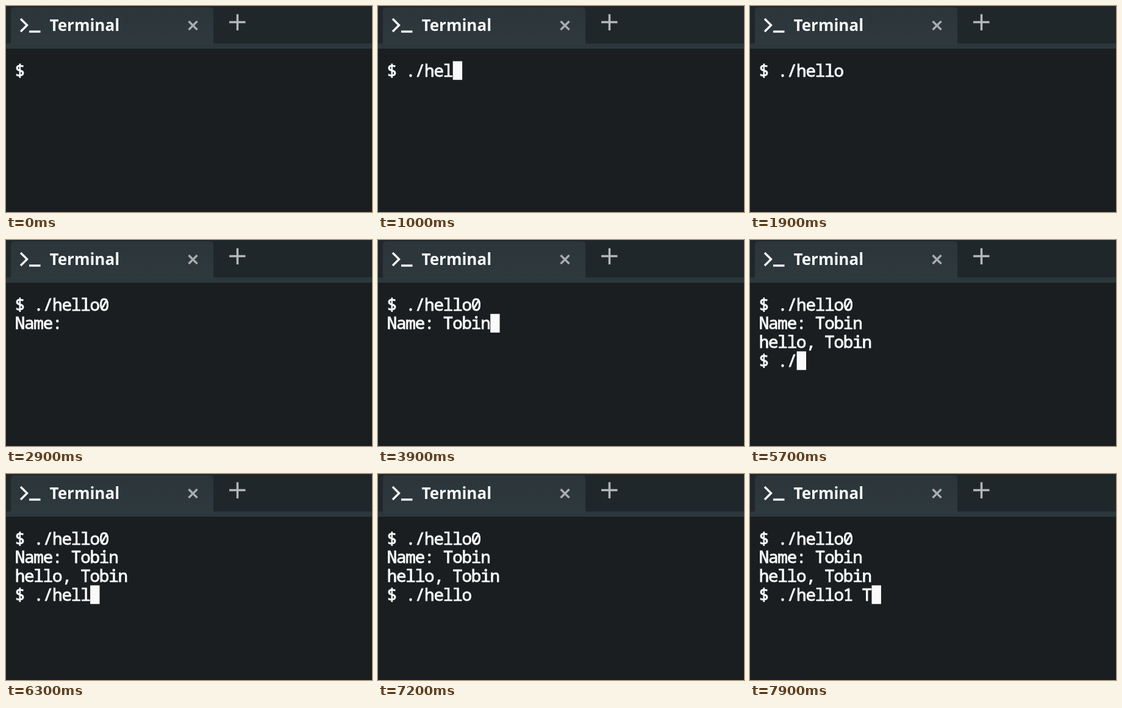
These frames come from a looping animation (600x338 px, 8000 ms). An HTML page:

```html
<!DOCTYPE html>
<html lang="en">
<head>
<meta charset="utf-8">
<title>Terminal</title>
<style>
  html, body { margin: 0; width: 100%; height: 100%; overflow: hidden; background: #1a1e20; }
  svg { display: block; width: 600px; height: 338px; }
  .title { font: 700 26px "Open Sans", "Noto Sans", sans-serif; fill: #f6f7f7; }
  #screen text {
    font: 400 27.5px "Noto Sans Mono", "DejaVu Sans Mono", monospace;
    letter-spacing: -1.14px;
    white-space: pre;
    fill: #f8f9f9;
    stroke: #f8f9f9;
    stroke-width: 0.9px;
  }
  path { fill: none; stroke-width: 3.5; }
</style>
</head>
<body>
<svg viewBox="0 0 600 338">
  <defs>
    <linearGradient id="tab" x2="0" y2="1">
      <stop stop-color="#2b353a"/>
      <stop offset="1" stop-color="#2e393e"/>
    </linearGradient>
  </defs>
  <rect width="600" height="338" fill="#1a1e20"/>
  <rect width="600" height="62" fill="#20272a"/>
  <rect y="61.5" width="600" height="8.5" fill="#2c373c"/>
  <path d="M8 64V8q0-6 6-6H334q6 0 6 6V64z" style="fill:url(#tab)"/>
  <path d="M24 21L34.5 31.5L24 42M38 42H56.5" stroke="#f4f5f5"/>
  <text class="title" x="71.5" y="41">Terminal</text>
  <path d="M299.5 25L313.5 39M313.5 25L299.5 39" stroke="#a9adaf"/>
  <path d="M366 26.5H392.5M379.5 13.5V40" stroke="#b4b8ba"/>
  <g id="screen">
    <text/><text/><text/><text/>
    <rect id="cursor" width="15.4" height="30.6" fill="#fafafa"/>
  </g>
</svg>
<script>
const LOOP = 8000, BLINK = 600;
const LEFT = 15.2, CELL = 15.36, TOP = 90.6, LINE = 30.7, BASELINE = 25;
const NAME = "Tobin";

// [time in ms, text that appears]
const events = [
  [-600, "$ "],
  [100, "."], [400, "/"], [800, "he"], [1000, "l"], [1100, "l"], [1300, "o"], [2000, "0"],
  [2300, "\nName: "],
  [3300, NAME[0]], [3400, NAME[1]], [3500, NAME[2]], [3700, NAME[3]], [3900, NAME[4]],
  [4100, `\nhello, ${NAME}\n$ `],
  [5500, "."], [5700, "/"], [6000, "h"], [6200, "el"], [6300, "l"], [6600, "o"],
  [7400, "1"], [7600, " "], [7900, NAME[0]]
];

const rows = [...document.querySelectorAll("#screen text")];
const cursor = document.getElementById("cursor");

rows.forEach((row, i) => {
  row.setAttribute("x", LEFT - 0.57);
  row.setAttribute("y", TOP + BASELINE + i * LINE);
});

function draw() {
  const t = performance.now() % LOOP;
  const shown = events.filter(([time]) => time <= t);
  const lines = shown.map(([, text]) => text).join("").split("\n");
  rows.forEach((row, i) => {
    const text = lines[i] || "";
    if (row.textContent !== text) row.textContent = text;
  });

  // The cursor turns solid on every key, then blinks.
  const idle = t - shown.at(-1)[0];
  const last = lines.length - 1;
  cursor.setAttribute("x", LEFT + lines[last].length * CELL);
  cursor.setAttribute("y", TOP + last * LINE);
  cursor.setAttribute("visibility", Math.floor(idle / BLINK) % 2 ? "hidden" : "visible");
  requestAnimationFrame(draw);
}
draw();
</script>
</body>
</html>
```
